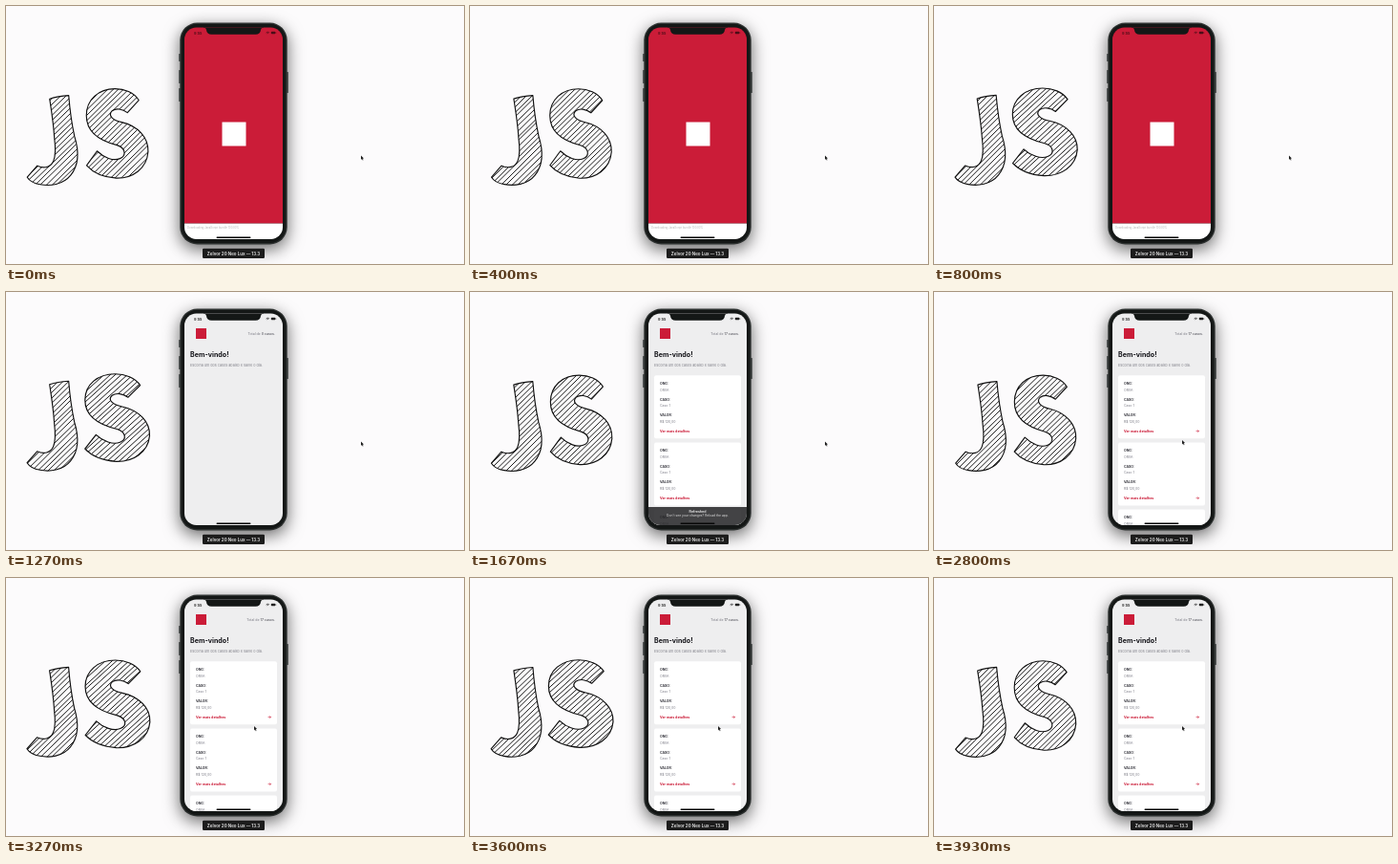
Write an HTML page with a canvas that moves like this. It is 480 px wide and 270 px high and loops after 3.99 s.

```html
<!DOCTYPE html>
<html lang="pt">
<head>
<meta charset="utf-8">
<title>App preview</title>
<style>
html, body { margin: 0; width: 100%; height: 100%; overflow: hidden; background: #fcfbfc; }
canvas { display: block; width: 480px; height: 270px; }
</style>
</head>
<body>
<canvas id="stage"></canvas>
<script>
const LOOP = 3990, FPS = 15, COUNT = 60;
const RED = '#cb1c38', INK = '#111';
const canvas = document.getElementById('stage');
const ctx = canvas.getContext('2d');
const dpr = window.devicePixelRatio || 1;
canvas.width = 480 * dpr;
canvas.height = 270 * dpr;

const letterJ = new Path2D('M46 97C52 95 58 94 66 93.5C67 106 69 122 72 136C77 152 77 166 68 177' +
  'C60 187 46 188.5 36 186.5C30 185.5 25 183 22.5 179L33 167C40 170 47 169 50 162' +
  'C53 155 52 146 51 138C50 122 48 110 46 97Z');
const letterS = new Path2D('M139 99L127 112C122 108 115 107 111 110C106 115 112 120 121 122' +
  'C138 126 149 138 148.5 153C147 171 132 181 115 180.5C102 179.5 91 175 84 167L95 152' +
  'C102 159 112 163 119 160C126 157 125 149 116 146C100 142 84 134 84 115' +
  'C84 98 97 87 114 87C124 87 134 91 139 99Z');

// 0 = narrow drawing, 1 = wide drawing, one per step of the wobble
const wobble = [0, 1, 1, 0, 0, 1, 0, 1, 1, 0, 1];

const clamp = v => Math.max(0, Math.min(1, v));
const progress = (t, a, b) => clamp((t - a) / (b - a));
const ease = v => v * v * (3 - 2 * v);

function random(seed) {
  let s = seed * 7919 + 17;
  return () => (s = (s * 16807) % 2147483647) / 2147483647;
}

function box(x, y, w, h, r, fill) {
  ctx.beginPath();
  ctx.roundRect(x, y, w, h, r);
  ctx.fillStyle = fill;
  ctx.fill();
}

function text(str, x, y, size, color, weight = 400, align = 'left') {
  ctx.font = `${weight} ${size}px Inter, Roboto, sans-serif`;
  ctx.textAlign = align;
  ctx.fillStyle = color;
  ctx.fillText(str, x, y);
}

function letter(path, cx, cy, sx, sy, dx, dy, turn, rnd) {
  ctx.save();
  ctx.translate(cx + dx, cy + dy);
  ctx.rotate(turn);
  ctx.scale(sx, sy);
  ctx.translate(-cx, -cy);
  ctx.strokeStyle = INK;
  ctx.lineJoin = 'round';
  ctx.lineWidth = 1.15;
  ctx.stroke(path);
  ctx.clip(path);
  ctx.lineWidth = 0.95;
  ctx.beginPath();
  const gap = 5.6;
  for (let y = cy - 95 + rnd() * gap; y < cy + 95; y += gap) {
    ctx.moveTo(cx - 40, y + 39 + rnd() * 2);
    ctx.lineTo(cx + 40, y - 39 + rnd() * 2);
  }
  ctx.stroke();
  ctx.restore();
}

function drawLetters(step) {
  const pose = step % wobble.length;
  const wide = wobble[pose];
  const rnd = random(pose + 1);
  const jit = n => (rnd() - 0.5) * n;
  letter(letterJ, 50, 140, 1, 1, -0.4 * wide + jit(0.6), jit(0.5), jit(0.012), rnd);
  letter(letterS, 116, 133.5, 1 + 0.05 * wide, 1 - 0.02 * wide,
    0.3 * wide + jit(0.8), -2 * wide + jit(0.8), jit(0.012), rnd);
}

function drawBody() {
  ctx.save();
  ctx.shadowColor = 'rgba(0,0,0,.6)';
  ctx.shadowBlur = 17 * dpr;
  ctx.shadowOffsetY = 5 * dpr;
  box(182.3, 17.6, 112.4, 231.8, 18, '#2b2f2e');
  ctx.restore();
  for (const [x, y, h] of [[181.3, 50, 8], [181.3, 67, 14], [181.3, 86, 14], [294.2, 69, 22]]) {
    box(x, y, 1.5, h, 0.5, '#2b302f');
  }
  box(183.8, 19, 109.4, 229, 16.5, '#141716');
}

function drawStatus(color) {
  text('9:55', 197, 29.6, 3.9, color, 600);
  ctx.strokeStyle = color;
  ctx.lineWidth = 0.7;
  for (const r of [1, 2.2]) {
    ctx.beginPath();
    ctx.arc(274.3, 29.4, r, Math.PI * 1.22, Math.PI * 1.78);
    ctx.stroke();
  }
  box(277.8, 26.8, 4.6, 2.5, 0.7, color);
  ctx.fillRect(282.7, 27.6, 0.5, 1);
}

function drawSplash() {
  ctx.fillStyle = RED;
  ctx.fillRect(187, 22, 104, 205.6);
  ctx.fillStyle = '#fff';
  ctx.fillRect(187, 227.6, 104, 17);
  ctx.fillRect(226.5, 121.5, 25, 25);
  text('Downloading JavaScript bundle 100.00%', 190, 233.4, 2.8, '#b4b4b4');
  drawStatus('#4b0d17');
}

function drawCard(y, arrows) {
  box(193, y, 91, 66, 2, '#fff');
  const rows = [['ONG:', 'ORVA'], ['CASO:', 'Caso 1'], ['VALOR:', 'R$ 120,00']];
  rows.forEach(([name, value], i) => {
    const base = y + 9.6 + i * 16.6;
    text(name, 199, base, 3.5, '#33333b', 700);
    text(value, 199, base + 6.6, 3.5, '#7d7d87');
  });
  text('Ver mais detalhes', 199, y + 59.4, 3.6, RED, 700);
  if (!arrows) return;
  ctx.strokeStyle = RED;
  ctx.lineWidth = 0.6;
  ctx.beginPath();
  ctx.moveTo(274.6, y + 58.3);
  ctx.lineTo(277.6, y + 58.3);
  ctx.moveTo(276.3, y + 57);
  ctx.lineTo(277.6, y + 58.3);
  ctx.lineTo(276.3, y + 59.6);
  ctx.stroke();
}

function drawHome(t) {
  const loaded = t >= 1400;
  ctx.fillStyle = '#eeeeef';
  ctx.fillRect(187, 22, 104, 223);
  drawStatus('#222');
  ctx.fillStyle = RED;
  ctx.fillRect(199, 38, 11, 11);
  const cases = `${loaded ? 17 : 0} casos.`;
  text(cases, 282, 44.9, 3.5, '#68686f', 600, 'right');
  const w = ctx.measureText(cases).width;
  text('Total de ', 282 - w, 44.9, 3.5, '#777780', 400, 'right');
  text('Bem-vindo!', 193, 67.8, 7.1, '#15151a', 700);
  text('Escolha um dos casos abaixo e salve o dia.', 193, 77.5, 3.72, '#83838b');
  if (loaded) for (let i = 0; i < 3; i++) drawCard(87.3 + i * 70.1, t >= 1800);
}

function drawToast(t) {
  const show = progress(t, 1400, 1530) * (1 - progress(t, 2600, 2800));
  if (!show) return;
  ctx.save();
  ctx.globalAlpha = show;
  ctx.fillStyle = 'rgba(42,42,44,.88)';
  ctx.fillRect(187, 225, 104, 20);
  text('Refreshed', 238.5, 230.6, 3.6, '#eee', 600, 'center');
  text('Don\'t see your changes? Reload the app.', 238.5, 235, 3.35, '#ddd', 400, 'center');
  ctx.restore();
}

function drawNotch() {
  ctx.beginPath();
  ctx.moveTo(207, 22);
  ctx.lineTo(207, 22.8);
  ctx.quadraticCurveTo(209.8, 22.8, 210, 25);
  ctx.quadraticCurveTo(210.4, 29.8, 215.5, 29.8);
  ctx.lineTo(261.5, 29.8);
  ctx.quadraticCurveTo(266.6, 29.8, 267, 25);
  ctx.quadraticCurveTo(267.2, 22.8, 270, 22.8);
  ctx.lineTo(270, 22);
  ctx.fillStyle = '#141716';
  ctx.fill();
}

function drawScreen(t) {
  ctx.save();
  ctx.beginPath();
  ctx.roundRect(187, 22.6, 103, 221.4, 12.5);
  ctx.clip();
  if (t < 1000) drawSplash();
  else {
    drawHome(t);
    drawToast(t);
  }
  drawNotch();
  box(220.5, 241.5, 36, 1.4, 0.7, '#080808');
  ctx.restore();
}

function drawLabel() {
  box(206, 253.7, 65, 10.3, 1.2, '#1c1c1c');
  text('Zelvor 20 Neo Lux — 13.3', 238.5, 260.6, 4.5, '#f2f2f2', 600, 'center');
}

function drawCursor(t) {
  const a = ease(progress(t, 1730, 2200));
  const b = ease(progress(t, 2300, 2650));
  const x = 372 - 114.6 * a + 2.6 * b;
  const y = 156.4 + 9.4 * a - 10.8 * b;
  ctx.beginPath();
  ctx.moveTo(x, y);
  ctx.lineTo(x, y + 4.4);
  ctx.lineTo(x + 1, y + 3.5);
  ctx.lineTo(x + 1.8, y + 5.2);
  ctx.lineTo(x + 2.5, y + 4.9);
  ctx.lineTo(x + 1.8, y + 3.2);
  ctx.lineTo(x + 3.1, y + 3.1);
  ctx.closePath();
  ctx.strokeStyle = 'rgba(255,255,255,.8)';
  ctx.lineWidth = 0.7;
  ctx.stroke();
  ctx.fillStyle = '#222';
  ctx.fill();
}

function draw(now) {
  const time = now % LOOP;
  const step = Math.min(COUNT - 1, Math.floor((time + 4) * FPS / 1000));
  const t = step * 1000 / FPS + 4;
  ctx.setTransform(dpr, 0, 0, dpr, 0, 0);
  ctx.fillStyle = '#fcfbfc';
  ctx.fillRect(0, 0, 480, 270);
  drawLetters(step);
  drawBody();
  drawScreen(t);
  drawLabel();
  drawCursor(t);
}

const start = performance.now();
function tick() {
  draw(performance.now() - start);
  requestAnimationFrame(tick);
}
tick();
</script>
</body>
</html>
```
